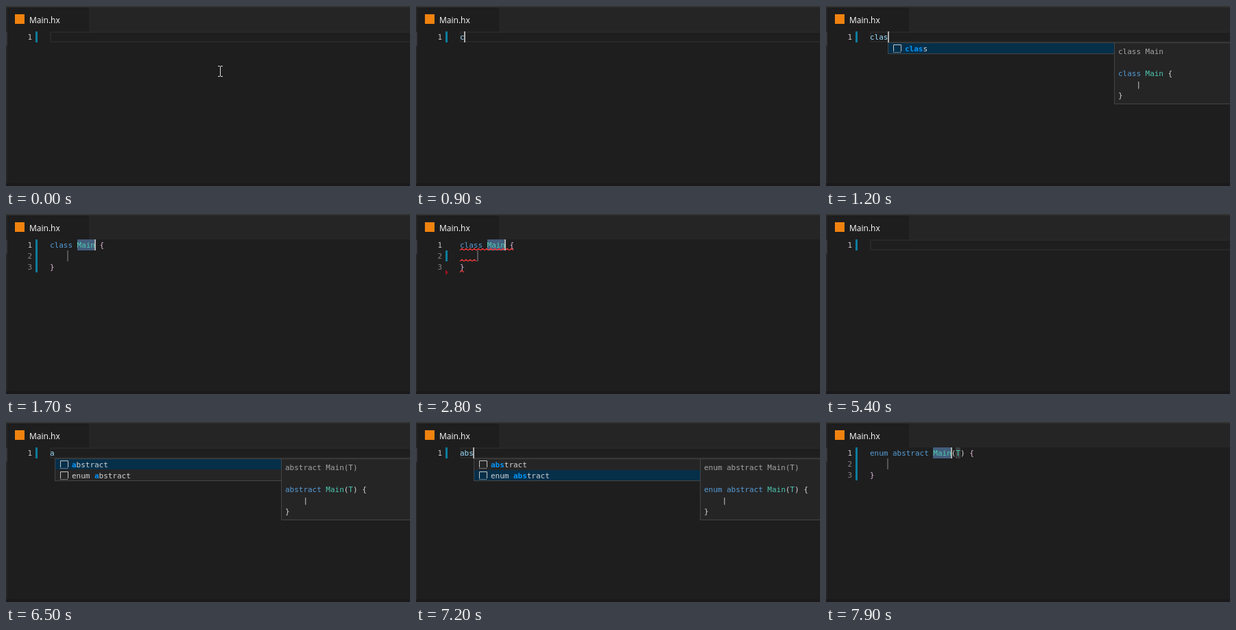
Write an HTML page with a canvas that moves like this. It is 589x262 px and loops after 8 s.

```html
<!DOCTYPE html>
<html lang="en">
<head>
<meta charset="utf-8">
<title>Keyword completion</title>
<style>
  html, body { margin: 0; width: 100%; height: 100%; overflow: hidden; background: #1e1e1e; }
  canvas { display: block; }
</style>
</head>
<body>
<canvas id="stage" width="589" height="262"></canvas>
<script>
const ctx = document.getElementById('stage').getContext('2d', { alpha: false });
const LOOP = 8000, LEFT = 64, TOP = 37, ROW = 16, CHAR = 6.597;
const MONO = '10.96px "DejaVu Sans Mono", monospace';
const TEXT = '#d4d4d4', KEYWORD = '#569cd6', TYPE = '#4ec9b0', BRACE = '#dfb9dc', WORD = '#9cdcfe';
const column = n => LEFT + n * CHAR;

// Each entry changes part of the state from its time onwards.
const timeline = [
  [0, { code: '', caret: false, mouse: 312 }],
  [100, { caret: true, mouse: 350 }],
  [200, { mouse: 393 }],
  [300, { mouse: 0 }],
  [600, { caret: false }],
  [900, { code: 'c', caret: true }],
  [1000, { code: 'cl', items: ['class'] }],
  [1100, { code: 'cla', doc: 'class Main' }],
  [1200, { code: 'clas' }],
  [1700, { code: 'class Main {', snippet: true, items: [], doc: '' }],
  [1900, { compared: true }],
  [2100, { caret: false }],
  [2600, { caret: true }],
  [2800, { errors: true }],
  [3100, { caret: false }],
  [3600, { caret: true }],
  [4200, { caret: false }],
  [4300, { code: 'clas', caret: true, snippet: false, errors: false }],
  [4500, { compared: false }],
  [4800, { code: '', caret: false }],
  [4900, { caret: true }],
  [5400, { caret: false }],
  [5900, { code: 'ab', caret: true }],
  [6000, { code: 'a' }],
  [6400, { caret: false }],
  [6500, { items: ['abstract', 'enum abstract'], doc: 'abstract Main(T)' }],
  [6600, { code: 'ab', caret: true }],
  [6800, { code: 'abs' }],
  [7200, { selected: 1, doc: 'enum abstract Main(T)' }],
  [7300, { caret: false }],
  [7800, { caret: true }],
  [7900, { code: 'enum abstract Main(T) {', snippet: true, items: [], doc: '' }]
];

function stateAt(time) {
  const state = { items: [], doc: '', selected: 0, snippet: false, compared: false, errors: false };
  for (const [start, change] of timeline) if (start <= time) Object.assign(state, change);
  return state;
}

function rect(x, y, w, h, color) {
  ctx.fillStyle = color;
  ctx.fillRect(x, y, w, h);
}

function box(x, y, w, h, fill, border) {
  rect(x, y, w, h, border);
  rect(x + 1, y + 1, w - 2, h - 2, fill);
}

function text(string, x, y, color, font = MONO) {
  ctx.font = font;
  ctx.fillStyle = color;
  ctx.fillText(string, x, y);
}

function highlight(line, x, y, braceColor) {
  for (const { 0: token, index } of line.matchAll(/\w+|[^\w\s]/g)) {
    const color = /^(class|enum|abstract)$/.test(token) ? KEYWORD
      : /^(Main|T)$/.test(token) ? TYPE
      : /[{}]/.test(token) ? braceColor
      : /\w/.test(token) ? WORD : TEXT;
    text(token, x + index * CHAR, y, color);
  }
}

function squiggle(row, length) {
  const y = TOP + row * ROW + 14.5, end = column(length);
  ctx.beginPath();
  for (let x = LEFT, i = 0; x <= end; x += 3, i++) ctx.lineTo(x, y + (i % 2 ? -1.2 : 1.2));
  ctx.strokeStyle = '#f33b3b';
  ctx.lineWidth = 1.1;
  ctx.stroke();
}

function drawFrame() {
  rect(0, 0, 589, 262, '#1e1e1e');
  rect(121, 0, 468, TOP, '#252526');
  rect(0, 0, 589, 2, '#333334');
  rect(0, 2, 2, 260, '#252526');
  rect(0, 38, 2, 20, '#37373d');
  rect(0, 258, 589, 4, '#1b191b');
  rect(13, 12, 14, 14, '#f0820f');
  text('Main.hx', 34, 25, '#ffffff', '12px "Open Sans", sans-serif');
}

function drawGutter({ snippet, compared }) {
  const rows = snippet ? 3 : 1;
  for (let i = 0; i < rows; i++) {
    text(i + 1, 31.5, TOP + 12 + i * ROW, i ? '#858585' : '#c6c6c6');
  }
  if (compared) {
    const y = TOP + rows * ROW;
    ctx.fillStyle = '#94151b';
    ctx.beginPath();
    ctx.moveTo(43, y - 4);
    ctx.lineTo(47, y);
    ctx.lineTo(43, y + 4);
    ctx.fill();
  }
  if (snippet && compared) rect(43, TOP + ROW, 3, ROW, '#0c7d9d');
  else rect(43, TOP, 3, rows * ROW, '#0c7d9d');
}

function drawCode({ code, snippet, errors, caret }) {
  let caretColumn = code.length;
  if (snippet) {
    const start = code.indexOf('Main');
    caretColumn = start + 4;
    rect(Math.round(column(start)), TOP, 26, ROW, '#435d7b');
    if (code.includes('(T)')) rect(Math.round(column(caretColumn + 1)), TOP, 7, ROW, '#3a3d40');
    rect(89, TOP + ROW, 2, ROW, '#565656');
    highlight('}', LEFT, TOP + 12 + 2 * ROW, BRACE);
  } else {
    ctx.strokeStyle = '#282828';
    ctx.lineWidth = 2;
    ctx.strokeRect(LEFT + 1, TOP + 1, 540, ROW - 2);
  }
  highlight(code, LEFT, TOP + 12, BRACE);
  if (errors) [code.length, 4, 1].forEach((length, row) => squiggle(row, length));
  if (caret) rect(Math.floor(column(caretColumn)), TOP, 2, ROW, '#aeafad');
}

function drawSnippetIcon(x, y) {
  ctx.strokeStyle = '#c5c5c5';
  ctx.lineWidth = 1;
  ctx.beginPath();
  ctx.moveTo(x + 0.5, y + 10);
  ctx.lineTo(x + 0.5, y + 0.5);
  ctx.lineTo(x + 11.5, y + 0.5);
  ctx.lineTo(x + 11.5, y + 10);
  ctx.stroke();
  for (let i = 0; i < 12; i += 2) rect(x + i, y + 11, 1, 1, '#c5c5c5');
}

function drawSuggestions({ code, items, selected, doc }) {
  if (!items.length) return;
  const x = Math.round(column(code.length)), y = TOP + ROW;
  box(x, y, 331, items.length * ROW + 1, '#252526', '#454545');
  items.forEach((item, i) => {
    const top = y + i * ROW, at = item.indexOf(code), end = at + code.length, left = x + 25;
    if (i === selected) rect(x + 1, top + 1, 329, ROW - 1, '#062f4a');
    drawSnippetIcon(x + 8, top + 3);
    text(item.slice(0, at), left, top + 13, TEXT);
    text(code, left + at * CHAR, top + 13, '#0097fb', 'bold ' + MONO);
    text(item.slice(end), left + end * CHAR, top + 13, TEXT);
  });
  if (!doc) return;
  const docX = x + 330, left = docX + 6;
  box(docX, y, 300, 90, '#252526', '#454545');
  text(doc, left, y + 17, '#a5a5a5');
  highlight(doc + ' {', left, y + 49, TEXT);
  text('|', left + 4 * CHAR, y + 65, TEXT);
  text('}', left, y + 81, TEXT);
}

function drawMouse(x) {
  if (!x) return;
  rect(x, 88, 1, 14, '#e0e0e0');
  for (const y of [87, 102]) {
    rect(x - 3, y, 3, 1, '#e0e0e0');
    rect(x + 1, y, 3, 1, '#e0e0e0');
  }
}

function render(now) {
  const state = stateAt(now % LOOP);
  drawFrame();
  drawGutter(state);
  drawCode(state);
  drawSuggestions(state);
  drawMouse(state.mouse);
  requestAnimationFrame(render);
}
requestAnimationFrame(render);
</script>
</body>
</html>
```
